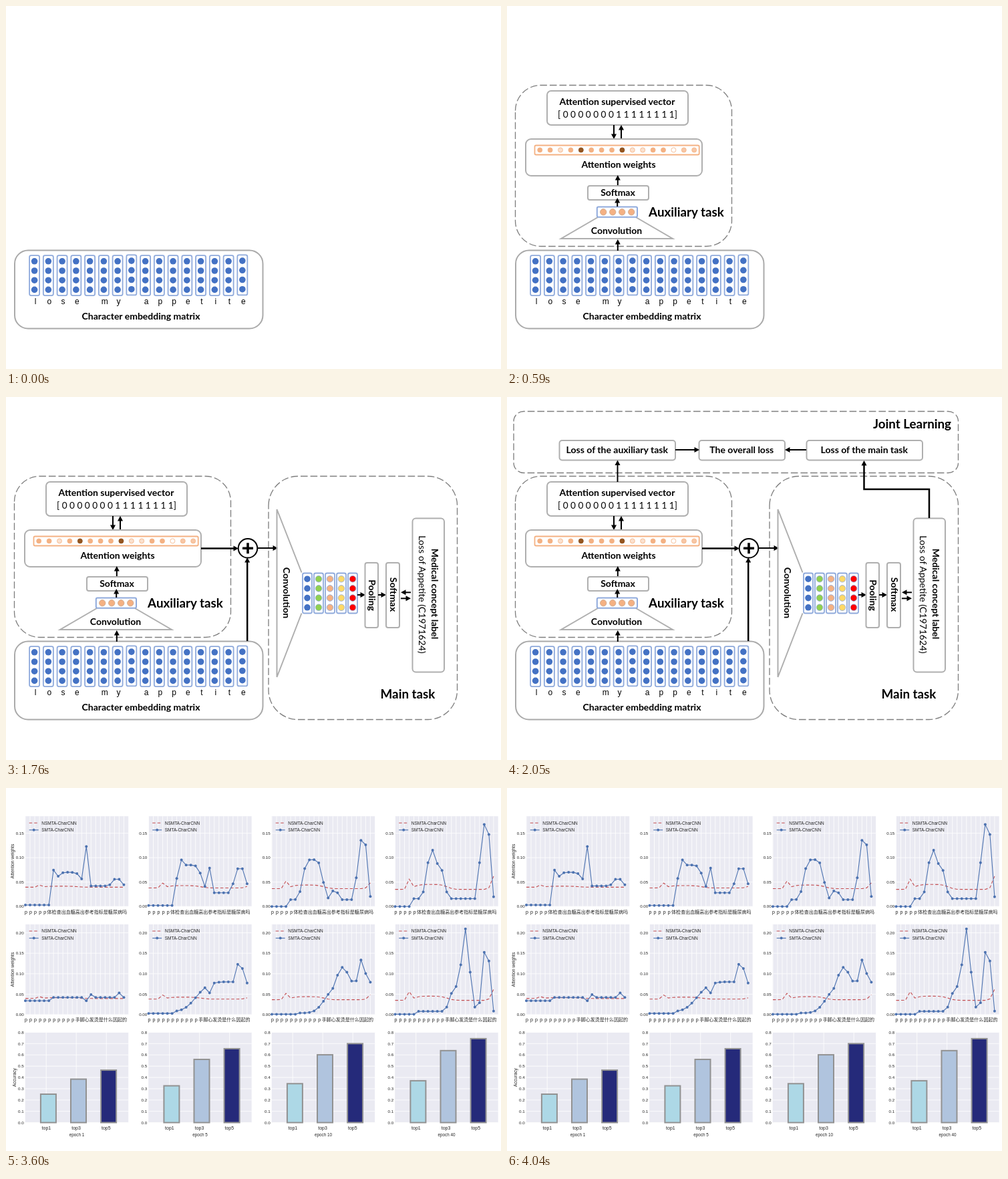
Write an HTML page that moves like this. It is 741x543 px and loops after 4330 ms.

```html
<!DOCTYPE html>
<html lang="en">
<head>
<meta charset="utf-8">
<title>Joint learning network</title>
<style>
html, body { margin: 0; width: 100%; height: 100%; overflow: hidden; background: #fff; }
svg { display: block; width: 741px; height: 543px; }
text { font: 14px Lato, sans-serif; fill: #000; }
.b { font-weight: 700; }
.h { font-weight: 700; font-size: 18.8px; }
.a { font-family: "Liberation Sans", Arial, sans-serif; }
.c { font-family: "Noto Sans CJK SC", "Noto Sans CJK", sans-serif; }
</style>
</head>
<body>
<svg id="stage" viewBox="0 0 741 543"></svg>
<script>
const LOOP = 4330;
const GRAY = '#afafaf', BLUE = '#4472c4', RIM = '#8faadc', PEACH = '#f4b183';
const stage = document.getElementById('stage');
let layer = stage;

function add(tag, attrs, content) {
  const el = document.createElementNS('http://www.w3.org/2000/svg', tag);
  for (const k in attrs) el.setAttribute(k, attrs[k]);
  if (content !== undefined) el.textContent = content;
  layer.appendChild(el);
  return el;
}

// Shows a layer between two times of the loop.
function scene(from, to, draw) {
  layer = stage;
  layer = add('g', {});
  draw();
  const step = (opacity, at) => ({ opacity, offset: at / LOOP, easing: 'step-end' });
  const end = to < LOOP ? 0 : 1;
  const frames = from ? [step(0, 0), step(1, from)] : [step(1, 0)];
  if (!end) frames.push(step(0, to));
  frames.push(step(end, LOOP));
  layer.animate(frames, { duration: LOOP, iterations: Infinity });
}

const box = (x1, y1, x2, y2, rx, stroke = GRAY, width = 2, fill = 'none') =>
  add('rect', { x: x1, y: y1, width: x2 - x1, height: y2 - y1, rx, stroke, 'stroke-width': width, fill });

const path = (d, stroke = GRAY, width = 2, extra = {}) =>
  add('path', { d, stroke, 'stroke-width': width, fill: 'none', ...extra });

// Rounded frame whose dashes start at the left side, below the top corner.
function dashed(x1, y1, x2, y2, r) {
  const turn = (x, y) => `A${r} ${r} 0 0 1 ${x} ${y}`;
  path(`M${x1} ${y1 + r}${turn(x1 + r, y1)}H${x2 - r}${turn(x2, y1 + r)}V${y2 - r}` +
    `${turn(x2 - r, y2)}H${x1 + r}${turn(x1, y2 - r)}Z`, '#7f7f7f', 1.33, { 'stroke-dasharray': '10.6 4' });
}

const dot = (cx, cy, r, fill, stroke = 'none') =>
  add('circle', { cx, cy, r, fill, stroke, 'stroke-width': 0.8 });

const label = (s, x, y, cls = 'b', extra = {}) =>
  add('text', { x, y, class: cls, 'text-anchor': 'middle', ...extra }, s);

const upright = (s, x, y, cls = 'b') =>
  label(s, 0, 0, cls, { transform: `translate(${x} ${y}) rotate(90)` });

// Polyline with an arrow head at its last point.
function arrow(pts, width = 2) {
  const [x, y] = pts[pts.length - 1], [px, py] = pts[pts.length - 2];
  const dx = Math.sign(x - px), dy = Math.sign(y - py);
  const line = [...pts.slice(0, -1), [x - dx * 5, y - dy * 5]];
  path('M' + line.join('L'), '#000', width);
  const bx = x - dx * 7.5, by = y - dy * 7.5;
  add('path', { d: `M${x} ${y}L${bx - dy * 4} ${by + dx * 4}L${bx + dy * 4} ${by - dx * 4}Z` });
}

function vector(x, y, w, fill, rim) {
  box(x - w / 2, y, x + w / 2, y + 60, 2.5, RIM, 1.8);
  for (let i = 0; i < 4; i++) dot(x, y + 8.7 + i * 14.2, 4.8, fill, rim);
}

function embedding() {
  box(13, 365.5, 384.5, 482.5, 20, '#aaa');
  [...'lose my appetite'].forEach((ch, i) => {
    const x = 42.6 + i * 20.75;
    vector(x, i % 8 === 7 ? 372.4 : 373.1, 15, BLUE);
    label(ch, x + 1.4, 446, 'a', { style: 'font-size:12px' });
  });
  label('Character embedding matrix', 202, 469);
}

function auxiliary() {
  dashed(12.5, 118.5, 336.5, 359.5, 38);
  box(60, 127, 271, 178, 6);
  label('Attention supervised vector', 165, 148);
  label('[ 0 0 0 0 0 0 0 1 1 1 1 1 1 1 1]', 165.5, 167, '', { style: 'font-size:13.6px' });
  arrow([[160, 178], [160, 199]]);
  arrow([[171, 199], [171, 178]]);

  box(28, 199, 292, 254, 8);
  box(41.5, 208.5, 287.7, 222.5, 2, PEACH, 1.8);
  const tones = { o: PEACH, l: '#fbe0cd', d: '#955620', w: '#fff', m: '#f8c6a4' };
  [...'oolodooodlloowmm'].forEach((k, i) =>
    dot(49.2 + i * 15.4, 215.4, 3.5, tones[k], k === 'd' ? '#8a4a18' : PEACH));
  label('Attention weights', 167, 242);

  arrow([[165.8, 269], [165.8, 253]]);
  box(121, 269, 212, 290, 3);
  label('Softmax', 166, 284);
  path('M136 316L81 348H248L193 316');
  box(134.8, 300.4, 195, 315.8, 2, RIM, 2, '#fff');
  for (let i = 0; i < 4; i++) dot(144.2 + i * 14, 308.2, 4.7, PEACH, '#c9a58c');
  arrow([[165.2, 300], [165.2, 287]]);
  label('Convolution', 164, 341);
  label('Auxiliary task', 268.5, 315, 'h');
  arrow([[165.8, 366], [165.8, 349]]);
}

function mainTask() {
  dashed(393, 118.5, 675.5, 482.5, 44);
  arrow([[292, 226.5], [348, 226.5]], 2.5);
  arrow([[361.2, 365], [361.2, 240]], 2.5);
  add('circle', { cx: 362, cy: 226.3, r: 14.3, fill: '#fff', stroke: '#000', 'stroke-width': 2 });
  path('M354 226.3H370M362 218.3V234.3', '#000', 3.6);
  arrow([[377, 226], [407, 226]]);

  path('M442.5 262.5L405.5 168V419L442.5 323.5');
  upright('Convolution', 414.5, 293);
  [BLUE, '#92d050', PEACH, '#ffd966', '#ff0000'].forEach((c, i) =>
    vector(451 + i * 17, 263.5, 14, c, i ? RIM : 'none'));
  arrow([[526, 296], [538, 296]]);
  box(537.5, 248, 557, 345, 3);
  upright('Pooling', 542.5, 296.5);
  arrow([[557, 296], [569, 296]]);
  box(569, 248, 589, 345, 3);
  upright('Softmax', 574.5, 295.5);
  arrow([[606, 292.3], [591, 292.3]]);
  arrow([[591, 301.3], [606, 301.3]]);

  box(608.5, 181.5, 656, 411.5, 5);
  upright('Medical concept label', 637, 294.5);
  upright('Loss of Appetite (C1971624)', 618, 295.5, '');
  label('Main task', 601.5, 451, 'h');
}

function joint() {
  dashed(10, 21.5, 675.5, 113.5, 15);
  label('Joint Learning', 606.5, 47, 'h');
  const loss = (x1, x2, s) => {
    box(x1, 65, x2, 94.5, 4);
    label(s, (x1 + x2) / 2 - 0.5, 84.3);
  };
  loss(78.5, 252, 'Loss of the auxiliary task');
  loss(287.5, 416, 'The overall loss');
  loss(448.5, 622, 'Loss of the main task');
  arrow([[252, 79], [288, 79]]);
  arrow([[448, 79], [416, 79]]);
  arrow([[165.5, 127], [165.5, 94.5]]);
  arrow([[632, 181], [632, 138], [534.5, 138], [534.5, 95]], 2.5);
}

const small = (s, x, y, size, anchor = 'middle', extra = {}) =>
  label(s, x, y, 'a', { 'text-anchor': anchor, style: `font-size:${size}px;fill:#262626`, ...extra });

const left = col => 28.7 + col * 184.5;
const WIDE = 154.5, GAP = 7.02;

// Panel background, grid and value axis.
function axes(x, bottom, scale, tick, count, digits, xs) {
  const top = bottom - 135;
  box(x, top, x + WIDE, bottom, 0, 'none', 0, '#eaeaf2');
  let grid = '';
  for (const gx of xs) grid += `M${gx} ${top}V${bottom}`;
  for (let i = 0; i <= count; i++) {
    const y = bottom - i * tick * scale;
    grid += `M${x} ${y}h${WIDE}`;
    small((i * tick).toFixed(digits), x - 2, y + 2.2, 6.2, 'end');
  }
  path(grid, '#fff', 0.8);
}

const RED = { 'stroke-dasharray': '4.5 3' };

// Flat-topped bump: centre, height, half width.
const bump = (i, c, h, w) => h * Math.exp(-(((i - c) / w) ** 4));

// The baseline weights drift a little further from flat with every column.
const plain = (i, col) => 39.5 - 1.5 * col + bump(i, 3, 4 + 5 * col, 0.6) +
  bump(i, 7.5, 2 + 2.7 * col, 4) + bump(i, 21.2, 3 * col * col, 1);

// Attention in thousandths: low on the padding, then a base with bumps.
function curves(col, row, low, start, base, ...bumps) {
  const x = left(col), bottom = row ? 339 : 177.2, scale = row ? 612 : 730;
  const words = [...(row ? 'ppppppppppp手脚心发烫是什么因起的' : 'ppppp体检查出血糖高出参考指标是糖尿病吗')];
  const px = i => x + 0.3 + i * GAP;
  const trace = f => words.map((_, i) => [px(i), bottom - f(i) * scale / 1000]);
  axes(x, bottom, scale, 0.05, row ? 4 : 3, 2, words.map((_, i) => px(i)));

  path('M' + trace(i => plain(i, col)).join('L'), '#c44e52', 1.1, RED);
  const pts = trace(i => i < start ? low : bumps.reduce((v, b) => v + bump(i, ...b), base));
  path('M' + pts.join('L'), '#4c72b0', 1.1);
  for (const [cx, cy] of pts) dot(cx, cy, 2, '#4c72b0');

  const ly = bottom - 125;
  path(`M${x + 6} ${ly}h14`, '#c44e52', 1.1, RED);
  path(`M${x + 6} ${ly + 10.6}h14`, '#4c72b0', 1.1);
  dot(x + 13, ly + 10.6, 2, '#4c72b0');
  small('NSMTA-CharCNN', x + 24.5, ly + 2.3, 6.5, 'start');
  small('SMTA-CharCNN', x + 24.5, ly + 12.9, 6.5, 'start');
  words.forEach((ch, i) =>
    label(ch, px(i) + 1, bottom + 10.3, 'c', { style: 'font-size:7px;fill:#262626' }));
}

function bars(col, epoch, ...values) {
  const x = left(col), bottom = 500.5, scale = 168.75;
  axes(x, bottom, scale, 0.1, 8, 1, [31.5, 76.5, 121.5].map(d => x + d));
  values.forEach((v, i) => {
    const bx = x + 23.2 + i * 45.1;
    box(bx, bottom - v * scale, bx + 23, bottom, 0, '#929292', 2, ['#add8e6', '#b0c4de', '#252a7a'][i]);
    small('top' + (i * 2 + 1), x + 31.7 + i * 44.7, 510.5, 7);
  });
  small('epoch ' + epoch, x + 77.3, 520.6, 6.3);
}

function charts() {
  box(0, 0, 741, 543, 0, 'none', 0, '#fff');
  curves(0, 0, 3, 6, 42, [6, 26, 0.6], [9.3, 28, 3], [13, 78, 0.6], [19.5, 14, 1.3]);
  curves(1, 0, 2, 6, 28, [8.7, 57, 3], [7, 16, 0.5], [13, 50, 0.5], [19.5, 50, 1.5]);
  curves(2, 0, 0, 4, 14, [8.7, 82, 2.4], [13.3, 18, 1], [19.3, 122, 1.3]);
  curves(3, 0, 0, 4, 16, [8.5, 72, 2.2], [7.7, 28, 0.8], [19.2, 152, 1.3]);
  curves(0, 1, 34, 6, 42, [13, -8, 0.5], [14, 7, 0.5], [20, 11, 0.6]);
  curves(1, 1, 3, 6, 8, [17.5, 72, 8], [13, -20, 0.6], [19.4, 46, 0.8]);
  curves(2, 1, 1, 6, 4, [18, 78, 7], [15, 36, 1.2], [19.2, 52, 0.8]);
  curves(3, 1, 1, 5, 8, [14, 62, 2.6], [15, 141, 1], [19.3, 145, 1.1]);
  bars(0, 1, 0.252, 0.385, 0.465);
  bars(1, 5, 0.326, 0.56, 0.655);
  bars(2, 10, 0.345, 0.601, 0.7);
  bars(3, 40, 0.371, 0.638, 0.744);
  const side = (s, x, y) => small(s, 0, 0, 6.8, 'middle', { transform: `translate(${x} ${y}) rotate(-90)` });
  side('Attention weights', 12.3, 109.5);
  side('Attention weights', 12.3, 271.5);
  side('Accuracy', 14.5, 433);
}

scene(0, 3600, embedding);
scene(590, 3600, auxiliary);
scene(1320, 3600, mainTask);
scene(2050, 3600, joint);
scene(3600, LOOP, charts);
</script>
</body>
</html>
```
